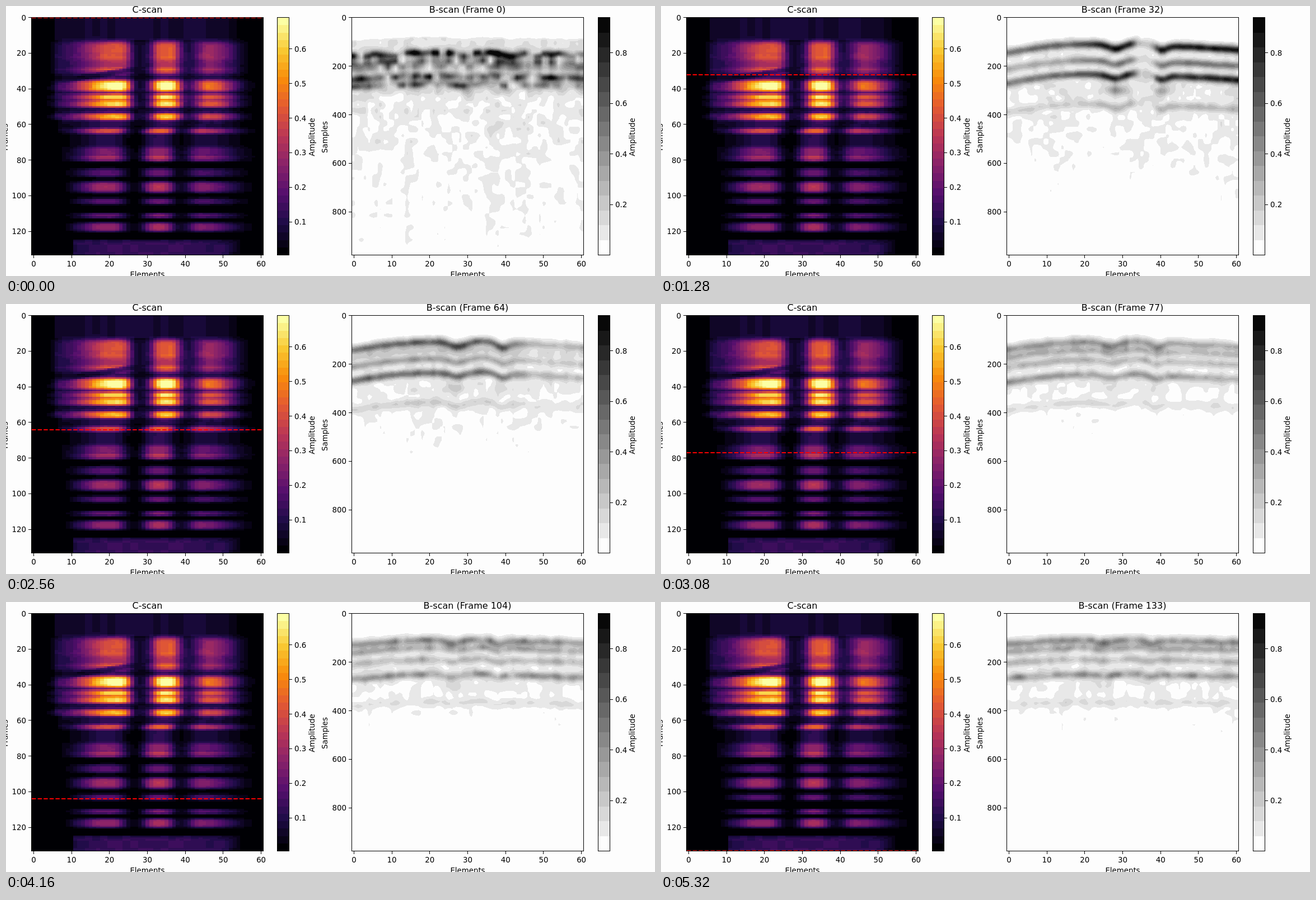
An HTML page with a canvas that plays this animation: 1159 by 483 pixels, repeating every 5360 ms.

```html
<!DOCTYPE html>
<html lang="en">
<head>
<meta charset="utf-8">
<title>Scan viewer</title>
<style>
html, body { margin: 0; width: 100%; height: 100%; overflow: hidden; background: #fdfdfd; }
canvas { display: block; }
</style>
</head>
<body>
<canvas id="stage" width="1159" height="483"></canvas>
<script>
const ctx = document.getElementById('stage').getContext('2d');
const COUNT = 134, STEP = 40, COLS = 61;
const TOP = 21, H = 424, W = 413, CX = 46, BX = 618;
const CELL = W / COLS, ROW = H / 133;
const FONT = '"DejaVu Sans", Verdana, sans-serif';

const clamp = (v, a, b) => Math.min(b, Math.max(a, v));
const mix = (a, b, t) => a + (b - a) * t;
const smooth = t => { t = clamp(t, 0, 1); return t * t * (3 - 2 * t); };
const bell = d => Math.exp(-d * d);
const plateau = d => Math.exp(-d * d * d * d);

function hash(x, y, z) {
  let h = Math.imul(x, 374761393) ^ Math.imul(y, 668265263) ^ Math.imul(z, 2146565729);
  h = Math.imul(h ^ (h >>> 13), 1274126177);
  h = Math.imul(h ^ (h >>> 15), 2246822519);
  return ((h ^ (h >>> 16)) >>> 0) / 4294967296;
}

function noise(x, y, z) {
  const i = Math.floor(x), j = Math.floor(y), k = Math.floor(z);
  const u = smooth(x - i), v = smooth(y - j), w = smooth(z - k);
  const plane = n => mix(
    mix(hash(i, j, n), hash(i + 1, j, n), u),
    mix(hash(i, j + 1, n), hash(i + 1, j + 1, n), u), v);
  return mix(plane(k), plane(k + 1), w);
}

// ---- C-scan ----
const INFERNO = [[0, 0, 4], [31, 12, 72], [85, 15, 109], [136, 34, 106], [186, 54, 85],
  [227, 89, 51], [249, 140, 10], [249, 201, 50], [252, 255, 164]];

function inferno(t) {
  const q = clamp(Math.floor(t * 32), 0, 31) / 31 * 8;
  const i = Math.min(7, Math.floor(q));
  return `rgb(${INFERNO[i].map((v, n) => Math.round(mix(v, INFERNO[i + 1][n], q - i)))})`;
}

// Bright bands: row, half height, strength
const BANDS = [[18, 5, .27], [25.5, 4, .19], [30, 2, .2], [38.3, 3.4, .54], [44.5, 1.7, .47],
  [48.3, 2, .46], [55.5, 2.1, .42], [63.5, 1.5, .28], [75.5, 3, .14], [79.2, 1.5, .18],
  [87, 2.5, .17], [95, 3.2, .28], [103, 1.9, .17], [111, 1.3, .2], [117.5, 2.6, .26]];

function rowLevel(r) {
  const floor = .09 * smooth((r - 11) / 4) * smooth((82 - r) / 4);
  return BANDS.reduce((sum, [c, h, s]) => sum + s * plateau((r - c) / h), floor);
}

function cValue(e, r) {
  const low = smooth((r - 56) / 10), level = rowLevel(r);
  const a = mix(21.5, 18.5, low), b = mix(35, 33, low), c = mix(46, 44, low);
  let left = e < a ? bell((e - a) / mix(10, 6.5, low)) : plateau((e - a) / mix(4.2, 5.6, low));
  const middle = Math.exp(-Math.pow(Math.abs(e - b) / 3.9, 3)) * mix(1.05, 1.15, low);
  const right = bell((e - c) / (e < c ? 3.4 : mix(7, 9, low))) * mix(.66, .85, low);
  // a dark diagonal cuts into the left column
  left *= 1 - .7 * plateau((r - 34.5 + (e - 10) / 3) / 1.6);
  const start = r < 58 ? 4.5 : 9.5 - 4 * bell((r - 65) / 20);
  const inside = smooth((e - start) / 2) * smooth((57 - e) / 8);
  const rim = r < 13 || r > 124 ? .065 : .03 * (1 - low) + .07 * level;
  const base = inside * rim * mix(.75, 1.25, hash(e >> 1, r < 13 ? 0 : r >> 2, 7));
  return base + level * (left + middle + right) + .07 * smooth((r - 124) / 3) * inside * bell((e - 30) / 24);
}

// ---- B-scan ----
// Echo lines: depth, shift at the start, shift at the end, then
// strength: constant, added in mid scan, added at the start
const ECHO = [
  [68, 16, 0, .32, .5, .2],
  [82, 16, 0, .24, -.24, .1],
  [97, 11, 5, .2, .25, 0],
  [122, 3, 7, .3, .42, .12],
  [175, -36, 3, .08, .12, .22]
];
// Poor contact: frame, element, width, depth
const FADES = [[28, 6, 15, .5], [30, 36, 3, .85], [67, 53, 12, .65]];
const GRID = 3, LINES = Math.ceil(H / GRID) + 2;
const field = new Float32Array(COLS * LINES);
const shot = ctx.createImageData(W, H);
const gray = i => i ? 248 - 16 * i : 253;

function fillField(f) {
  const early = 1 - smooth(f / 26), late = smooth((f - 55) / 40);
  const mid = plateau((f - 42) / 22);
  const lines = ECHO.map(([y, a, b, s, m, n]) => [y + a * early + b * late, s + m * mid + n * early]);
  const rough = .12 + 1.1 * early + .4 * late;
  const arch = 1 - .6 * early - .55 * smooth((f - 50) / 80);
  const haze = .08 + .028 * Math.max(mid, early), reach = 115 + 85 * mid + 175 * early;
  const deep = .08 + .38 * bell((f - 42) / 16);
  const c1 = 29 - f / 36, c2 = 41.3 - f / 33, z = f / 3;

  for (let e = 0; e < COLS; e++) {
    const side = FADES.reduce((g, [t, x, w, d]) =>
      g * (1 - d * bell((f - t) / 10) * plateau((e - x) / w)), 1);
    const d1 = bell((e - c1) / 2.6), d2 = bell((e - c2) / 2);
    const curve = e < 20 ? 15 * Math.pow((20 - e) / 20, 1.7) : 10 * Math.pow((e - 20) / 40, 2);
    const bend = arch * (curve + 7 * (d1 + d2) - 3 * bell((e - 34) / 3));
    const column = .7 + .6 * noise(e / 2, 90, z / 3);
    for (let j = 0; j < LINES; j++) {
      const y = TOP + j * GRID, p = y - bend;
      let v = 0;
      if (p > 45) {
        const n = noise(e / 1.4, y / 11, z);
        const grain = Math.max(0, 1 + rough * (noise(e / 1.8 + 40, y / 16 + 50, z) * 2 - 1));
        for (const [depth, gain] of lines) v += gain * bell((p - depth) / 7) * side * grain;
        v += deep * (d1 + .7 * d2) * bell((y - 150) / 9);
        v += .2 * (d1 + d2) * bell((p - lines[0][0] - 5) / 6);
        const fade = haze * Math.exp(-(y - 140) / reach) * smooth((p - 50) / 14);
        v += (p < 115 ? Math.min(fade, .075) : fade) * n * 1.6 * column;
        v += .05 * early * smooth((p - 52) / 6) * smooth((165 - p) / 20);
      }
      field[j * COLS + e] = v;
    }
  }
}

function paintField() {
  const out = shot.data;
  for (let y = 0, o = 0; y < H; y++) {
    const j = Math.floor(y / GRID), t = y / GRID - j;
    for (let x = 0; x < W; x++, o += 4) {
      const q = clamp((x + .5) / CELL - .5, 0, COLS - 1.001);
      const e = Math.floor(q), u = q - e, a = j * COLS + e, b = a + COLS;
      const v = mix(mix(field[a], field[a + 1], u), mix(field[b], field[b + 1], u), t);
      const level = clamp(Math.floor(v / .938 * 16), 0, 15);
      out[o] = out[o + 1] = out[o + 2] = gray(level);
      out[o + 3] = 255;
    }
  }
  ctx.putImageData(shot, BX, TOP);
}

// ---- Axes ----
function label(c, text, x, y, align = 'center', size = 13.333) {
  c.font = `${size}px ${FONT}`;
  c.textAlign = align;
  c.fillStyle = '#000';
  c.fillText(text, x, y);
}

function upright(c, text, x) {
  c.save();
  c.translate(x, 234.5);
  c.rotate(-Math.PI / 2);
  label(c, text, 0, 0);
  c.restore();
}

function tick(c, x, y, w, h) {
  c.fillStyle = '#000';
  c.fillRect(Math.round(x), Math.round(y), w, h);
}

function frameBox(c, x, w) {
  c.strokeStyle = '#000';
  c.lineWidth = 1;
  c.strokeRect(x - .5, TOP - .5, w + 1, H + 1);
}

function axes(c, x, step, max, scale) {
  for (let v = 0; v <= 60; v += 10) {
    const tx = x + (v + .5) * CELL;
    tick(c, tx - .5, TOP + H + 1, 1, 5);
    label(c, String(v), tx, 466);
  }
  for (let v = 0; v <= max; v += step) {
    const ty = TOP - .5 + v * scale;
    tick(c, x - 6, ty - .5, 5, 1);
    label(c, String(v), x - 10, ty + 5.2, 'right');
  }
  label(c, 'Elements', x + W / 2, 485);
}

function colorbar(c, x, w, bands, color, step, count, yOf, textX) {
  for (let i = 0; i < bands; i++) {
    const y0 = Math.round(TOP + H * (1 - (i + 1) / bands));
    const y1 = Math.round(TOP + H * (1 - i / bands));
    c.fillStyle = color(i);
    c.fillRect(x, y0, w, y1 - y0);
  }
  frameBox(c, x, w);
  for (let i = 1; i <= count; i++) {
    const y = yOf(i * step);
    tick(c, x + w + 1, y - .5, 5, 1);
    label(c, (i * step).toFixed(1), x + w + 10, y + 5, 'left');
  }
  upright(c, 'Amplitude', textX);
}

function buildBackdrop() {
  const layer = document.createElement('canvas');
  layer.width = 1159;
  layer.height = 483;
  const c = layer.getContext('2d');
  c.fillStyle = '#fdfdfd';
  c.fillRect(0, 0, 1159, 483);
  for (let r = 0; r < COUNT; r++) {
    const y0 = Math.round(TOP + Math.max(0, r - .5) * ROW);
    const y1 = Math.round(TOP + Math.min(133, r + .5) * ROW);
    for (let e = 0; e < COLS; e++) {
      const x0 = Math.round(CX + e * CELL), x1 = Math.round(CX + (e + 1) * CELL);
      c.fillStyle = inferno(cValue(e, r) / .69);
      c.fillRect(x0, y0, x1 - x0, y1 - y0);
    }
  }
  axes(c, CX, 20, 120, ROW);
  axes(c, BX, 200, 800, .4345);
  label(c, 'C-scan', 252.5, 12, 'center', 16);
  upright(c, 'Frames', 3);
  upright(c, 'Samples', 574);
  colorbar(c, 485, 20, 32, i => inferno((i + .5) / 32), .1, 6, v => 447.8 - v * 618, 551);
  colorbar(c, 1058, 20, 16, i => `rgb(${gray(i)},${gray(i)},${gray(i)})`,
    .2, 4, v => 445.6 - v * 452.5, 1123);
  return layer;
}

const backdrop = buildBackdrop();

function marker(f) {
  const y = Math.round(TOP + f * ROW - .2);
  ctx.save();
  ctx.beginPath();
  ctx.rect(CX, TOP, W, H);
  ctx.clip();
  ctx.strokeStyle = '#f00';
  ctx.lineWidth = 2;
  ctx.setLineDash([7.4, 3.2]);
  ctx.beginPath();
  ctx.moveTo(CX, y);
  ctx.lineTo(CX + W, y);
  ctx.stroke();
  ctx.restore();
}

function draw(f) {
  ctx.drawImage(backdrop, 0, 0);
  fillField(f);
  paintField();
  marker(f);
  frameBox(ctx, CX, W);
  frameBox(ctx, BX, W);
  label(ctx, `B-scan (Frame ${f})`, 824, 12, 'center', 16);
}

let shown = 0, begin = null;
function play(now) {
  if (begin === null) begin = now;
  const f = Math.floor(Math.max(0, now - begin) / STEP) % COUNT;
  if (f !== shown) draw(shown = f);
  requestAnimationFrame(play);
}
draw(shown);
requestAnimationFrame(play);
</script>
</body>
</html>
```
